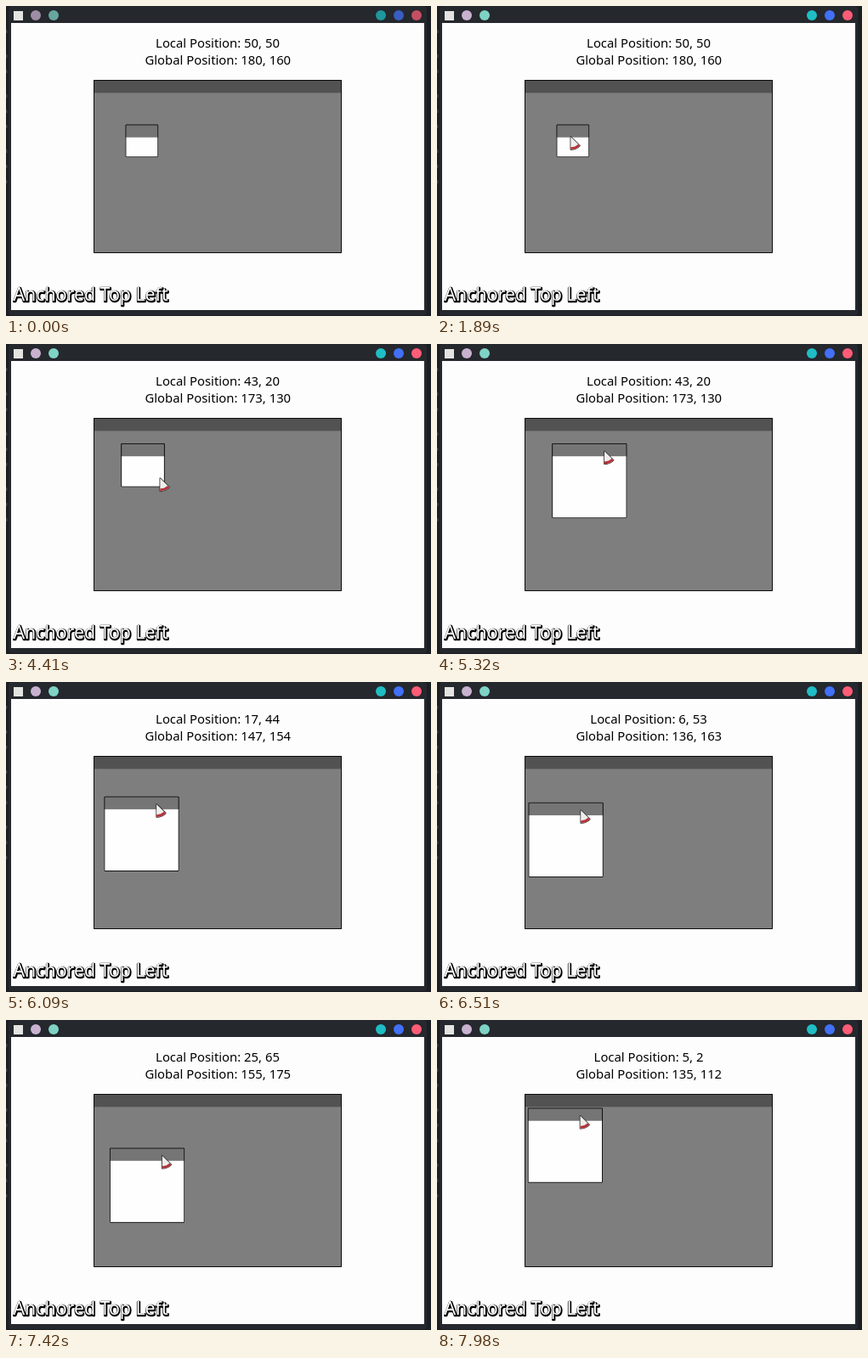
Write an HTML page with a canvas that moves like this. It is 500 px wide and 365 px high and loops after 8000 ms.

```html
<!DOCTYPE html>
<html lang="en">
<head>
<meta charset="utf-8">
<title>Anchored Top Left</title>
<style>
  html, body { margin: 0; width: 100%; height: 100%; overflow: hidden; background: #1b1e23; }
  canvas { display: block; width: 500px; height: 365px; }
</style>
</head>
<body>
<canvas id="stage" width="500" height="365"></canvas>
<script>
const ctx = document.getElementById('stage').getContext('2d');
const LOOP = 8000, STEP = 70, SCALE = 0.75;
const ORIGIN = { x: 102.9, y: 101.9 };
const TITLE_HEIGHT = 15.3;

// Eases from 0 to 1 between two times.
function progress(t, start, end) {
  const k = Math.min(1, Math.max(0, (t - start) / (end - start)));
  return k * k * (3 - 2 * k);
}

// Applies each move in turn to a starting point.
function follow(t, from, moves) {
  return moves.reduce((p, { start, end, x, y }) => {
    const k = progress(t, start, end);
    return { x: p.x + (x - p.x) * k, y: p.y + (y - p.y) * k };
  }, from);
}

const drags = [
  { start: 2310, end: 3150, x: 43, y: 20 },
  { start: 5320, end: 6510, x: 6, y: 53 },
  { start: 6510, end: 6930, x: 26, y: 67 },
  { start: 7350, end: 7980, x: 5, y: 2 }
];

// Pointer moves are relative to the corner of the child panel.
const reaches = [
  { start: 840, end: 1120, x: 102, y: -130 },
  { start: 1470, end: 1890, x: 16.6, y: 14.4 },
  { start: 3290, end: 3570, x: 42.5, y: 48.8 },
  { start: 3570, end: 3850, x: 33, y: 28 },
  { start: 5040, end: 5320, x: 12, y: -40.5 }
];

function sceneAt(t) {
  const local = follow(t, { x: 50, y: 50 }, drags);
  const growth = 49.5 * progress(t, 4130, 4970);
  const x = ORIGIN.x + local.x * SCALE;
  const y = ORIGIN.y + local.y * SCALE;
  const reach = follow(t, { x: 106, y: -160 }, reaches);
  return {
    local, x, y,
    side: 38.9 + growth,
    pointer: { x: x + reach.x + growth, y: y + reach.y + growth },
    focus: progress(t, 0, 560)
  };
}

function rect(color, x, y, w, h) {
  ctx.fillStyle = color;
  ctx.fillRect(x, y, w, h);
}

function disc(color, x) {
  ctx.fillStyle = color;
  ctx.beginPath();
  ctx.arc(x, 11, 6, 0, Math.PI * 2);
  ctx.fill();
}

function panel(x, y, w, h, body, title) {
  rect(body, x, y, w, h);
  rect(title, x, y, w, TITLE_HEIGHT);
  ctx.strokeStyle = '#0c0c0c';
  ctx.lineWidth = 1;
  ctx.strokeRect(x + 0.5, y + 0.5, w - 1, h - 1);
}

function drawWindow(focus) {
  rect('#1b1e23', 0, 0, 500, 365);
  for (let i = 0; i < 9; i++) rect('#3b4047', 0, 28 + i * 22 + (i * 7) % 11, 1.5, 4);
  ctx.fillStyle = '#25282d';
  ctx.beginPath();
  ctx.roundRect(3, 0, 492, 364, 4);
  ctx.fill();
  rect('#fdfdfd', 6, 20, 486, 338);
  rect('#e4e4e2', 9, 6, 11, 11);
  ctx.globalAlpha = 0.74 + 0.26 * focus;
  ['#c9b2d0', '#7ed3c6'].forEach((color, i) => disc(color, 35 + 21 * i));
  ['#1fbec4', '#4270f6', '#ff5c78'].forEach((color, i) => disc(color, 441 + 21 * i));
  ctx.globalAlpha = 1;
}

function drawText(local) {
  const x = Math.round(local.x), y = Math.round(local.y);
  ctx.fillStyle = '#000';
  ctx.textAlign = 'center';
  ctx.font = '14.85px "Noto Sans", sans-serif';
  ctx.fillText(`Local Position: ${x}, ${y}`, 249, 49.3);
  ctx.fillText(`Global Position: ${x + 130}, ${y + 110}`, 249.3, 69.3);

  ctx.textAlign = 'left';
  ctx.font = '21.3px "Noto Sans", sans-serif';
  ctx.lineJoin = 'round';
  ctx.lineWidth = 2.4;
  ctx.strokeStyle = '#000';
  ctx.strokeText('Anchored Top Left', 9.2, 348);
  ctx.fillStyle = '#fff';
  ctx.fillText('Anchored Top Left', 8.5, 347.3);
}

function drawPointer({ x, y }) {
  ctx.save();
  ctx.translate(x, y);
  ctx.beginPath();
  ctx.moveTo(0.3, 0.3);
  ctx.lineTo(11, 10.8);
  ctx.quadraticCurveTo(7, 15.3, 0.3, 15.3);
  ctx.closePath();
  ctx.lineJoin = 'round';
  ctx.lineWidth = 1.5;
  ctx.strokeStyle = '#2c2626';
  ctx.stroke();
  ctx.clip();
  rect('#eeeeec', 0, 0, 12, 16);
  ctx.beginPath();
  ctx.moveTo(11, 10.8);
  ctx.quadraticCurveTo(7, 15.3, 0, 15.3);
  ctx.lineWidth = 5.5;
  ctx.strokeStyle = '#b83238';
  ctx.stroke();
  ctx.restore();
}

function draw(t) {
  const { local, x, y, side, pointer, focus } = sceneAt(t);
  drawWindow(focus);
  drawText(local);
  panel(103, 87, 292, 204, '#7e7e7e', '#525252');
  panel(x, y, side, side, '#fefefe', '#757575');
  drawPointer(pointer);
}

const start = performance.now();
function frame() {
  const t = (performance.now() - start) % LOOP;
  draw(Math.floor(t / STEP) * STEP);
  requestAnimationFrame(frame);
}
frame();
</script>
</body>
</html>
```
